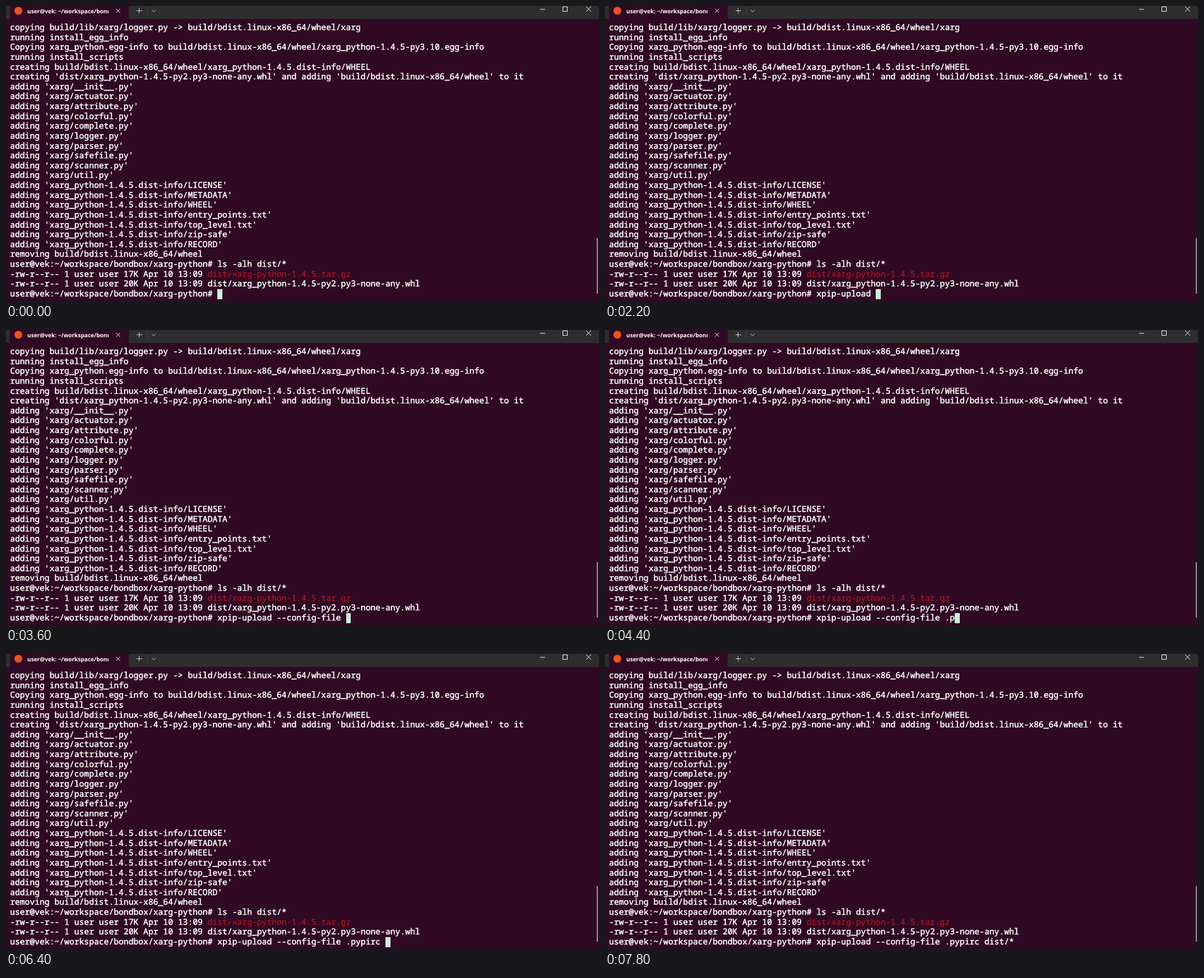
These frames come from a looping animation (1058 px wide and 529 px high, 8 s). An HTML page with a canvas:

```html
<!DOCTYPE html>
<html lang="en">
<head>
<meta charset="utf-8">
<title>Terminal</title>
<style>
  html, body { margin: 0; width: 100%; height: 100%; overflow: hidden; background: #300a24; }
  canvas, pre, #tab { position: absolute; margin: 0; white-space: pre; text-rendering: geometricPrecision; }
  canvas { left: 0; top: 0; }
  pre {
    left: 7.15px; top: 30px; color: #fff;
    font: 500 14.692px/17.63px "Noto Sans Mono", "DejaVu Sans Mono", monospace;
    font-variant-ligatures: none;
    -webkit-text-stroke: 0.5px;
  }
  #tab {
    left: 38px; top: 1px; width: 145px; overflow: hidden; color: #fff;
    font: 700 10.1px/17px "Open Sans", "Noto Sans", sans-serif;
  }
  .archive { color: #c21a23; -webkit-text-stroke: 0; }
</style>
</head>
<body>
<canvas id="stage" width="1058" height="529"></canvas>
<div id="tab">user@vek: ~/workspace/bondbox/xarg-python</div>
<pre id="screen"></pre>
<script>
const CELL = 8.815, LEFT = 7.15, CURSOR_TOP = 506, STEP = 200;
const ctx = document.getElementById('stage').getContext('2d');

const modules = ['__init__', 'actuator', 'attribute', 'colorful', 'complete',
  'logger', 'parser', 'safefile', 'scanner', 'util'];
const metadata = ['LICENSE', 'METADATA', 'WHEEL', 'entry_points.txt',
  'top_level.txt', 'zip-safe', 'RECORD'];
const wheelDir = 'build/bdist.linux-x86_64/wheel';
const wheelFile = 'dist/xarg_python-1.4.5-py2.py3-none-any.whl';
const prompt = 'user@vek:~/workspace/bondbox/xarg-python# ';
const listing = size => `-rw-r--r-- 1 user user ${size} Apr 10 13:09 `;

const lines = [
  `copying build/lib/xarg/logger.py -> ${wheelDir}/xarg`,
  'running install_egg_info',
  `Copying xarg_python.egg-info to ${wheelDir}/xarg_python-1.4.5-py3.10.egg-info`,
  'running install_scripts',
  `creating ${wheelDir}/xarg_python-1.4.5.dist-info/WHEEL`,
  `creating '${wheelFile}' and adding '${wheelDir}' to it`,
  ...modules.map(name => `adding 'xarg/${name}.py'`),
  ...metadata.map(name => `adding 'xarg_python-1.4.5.dist-info/${name}'`),
  `removing ${wheelDir}`,
  prompt + 'ls -alh dist/*',
  listing('17K')
];

const screen = document.getElementById('screen');
const archive = document.createElement('span');
archive.className = 'archive';
archive.textContent = 'dist/xarg-python-1.4.5.tar.gz';
const command = document.createElement('span');
screen.append(lines.join('\n'), archive, `\n${listing('20K')}${wheelFile}\n${prompt}`, command);

// Each beat types some text; BLINK toggles the cursor instead.
const BLINK = null;
const beats = [
  '', BLINK, 'x', 'p', 'i', 'p', '-',
  'u', 'p', 'load ', BLINK, BLINK, BLINK,
  '-', '-', 'c', 'onfig-file ', BLINK, BLINK, BLINK, BLINK,
  '.', 'p', BLINK, BLINK, BLINK, BLINK,
  'y', 'pirc ', BLINK, BLINK, BLINK, BLINK, BLINK,
  'd', 'i', 's', 't/', '*', BLINK
];
let typed = '', lit = true;
const states = beats.map(beat => {
  lit = beat === BLINK ? !lit : true;
  typed += beat || '';
  return { typed, lit };
});

function box(color, x, y, w, h) {
  ctx.fillStyle = color;
  ctx.fillRect(x, y, w, h);
}

function line(color, ...points) {
  ctx.strokeStyle = color;
  ctx.lineWidth = 1;
  ctx.beginPath();
  points.forEach(([x, y]) => ctx.lineTo(x, y));
  ctx.stroke();
}

function cross(x, y, r) {
  line('#fff', [x - r, y - r], [x + r, y + r]);
  line('#fff', [x - r, y + r], [x + r, y - r]);
}

function drawWindow() {
  box('#300a24', 0, 0, 1058, 529);
  box('#2e2e2e', 0, 0, 1058, 23);
  box('#300a24', 7, 0, 212, 23);
  ctx.fillStyle = '#e95420';
  ctx.beginPath();
  ctx.arc(22, 8.5, 7, 0, Math.PI * 2);
  ctx.fill();
  cross(200, 8.5, 3.5);
  line('#e0e0e0', [233, 8.5], [243, 8.5]);
  line('#e0e0e0', [237.5, 4], [237.5, 13]);
  line('#444', [252.5, 2], [252.5, 16]);
  line('#d0d0d0', [260, 7], [263.5, 10.5], [267, 7]);
  line('#fff', [953, 6], [962, 6]);
  ctx.strokeRect(993.5, 1.5, 8, 8);
  cross(1039.5, 5.5, 4.5);
  box('#a096a0', 1054, 415, 2, 99);
}

function drawCursor(column) {
  const x = LEFT + CELL * column;
  const left = Math.round(x);
  box('#cdeedb', left, CURSOR_TOP, Math.round(x + CELL) - left, 18);
}

function render() {
  const step = Math.floor(performance.now() / STEP) % states.length;
  const state = states[step];
  drawWindow();
  if (state.lit) drawCursor(prompt.length + state.typed.length);
  if (command.textContent !== state.typed) command.textContent = state.typed;
  requestAnimationFrame(render);
}
render();
</script>
</body>
</html>
```
